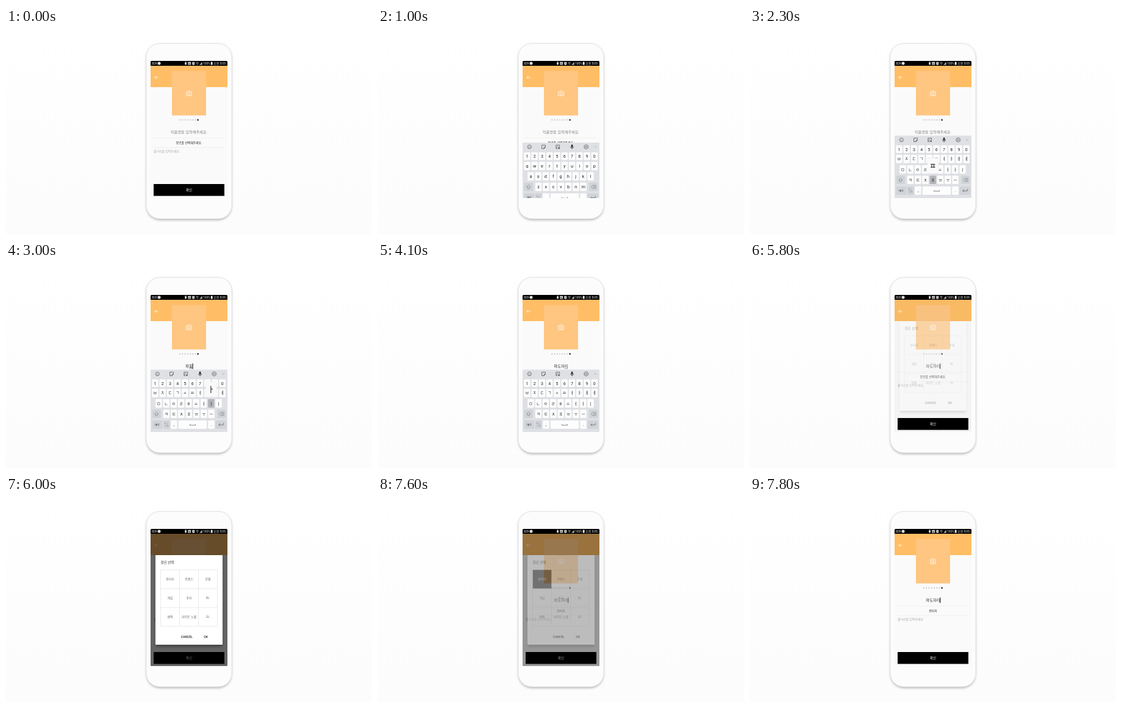
Recreate the animation shown at these times as an HTML page. Size 600x338 px, loop 8000 ms.

```html
<!DOCTYPE html>
<html lang="ko">
<head>
<meta charset="utf-8">
<title>작품 등록</title>
<style>
html, body { margin: 0; width: 100%; height: 100%; overflow: hidden; background: #fefefe; }
svg { display: block; width: 600px; height: 338px; }
text { font-family: 'Noto Sans CJK KR', 'Noto Sans CJK JP', 'Noto Sans CJK', sans-serif; }
.latin { font-family: Roboto, 'Noto Sans CJK KR', sans-serif; }
</style>
</head>
<body>
<svg id="stage" viewBox="0 0 600 338">
  <defs>
    <linearGradient id="wall" x2="0" y2="1"><stop stop-color="#fff"/><stop offset="1" stop-color="#fcfcfc"/></linearGradient>
    <filter id="soft" x="-20%" y="-20%" width="140%" height="140%"><feGaussianBlur stdDeviation="2"/></filter>
    <clipPath id="screen"><rect x="237" y="54" width="126" height="225" rx="1.5"/></clipPath>
  </defs>
  <rect width="600" height="338" fill="url(#wall)"/>
  <rect x="230.5" y="27" width="139" height="288" rx="22" fill="#000" opacity=".3" filter="url(#soft)"/>
  <rect x="230" y="25.5" width="140" height="287.5" rx="22" fill="#fcfcfc" stroke="#e2e2e2" stroke-width=".8"/>
  <g clip-path="url(#screen)">
    <rect x="237" y="54" width="126" height="225" fill="#fafafa"/>
    <g id="page"></g>
    <g id="keyboard"></g>
    <rect id="dim" x="237" y="62" width="126" height="217"/>
    <g id="dialog"></g>
    <g id="status"></g>
  </g>
</svg>
<script>
const LOOP = 8000, STEP = 100;
const TITLE_SIZE = 6.2, SYLLABLE = 0.92 * TITLE_SIZE;
const $ = id => document.getElementById(id);
const clamp = v => Math.max(0, Math.min(1, v));
const ramp = (t, from, to) => clamp((t - from) / (to - from));

function add(parent, tag, attrs) {
  const el = document.createElementNS('http://www.w3.org/2000/svg', tag);
  for (const k in attrs) el.setAttribute(k, attrs[k]);
  parent.appendChild(el);
  return el;
}
const rect = (g, x, y, width, height, fill, more) => add(g, 'rect', { x, y, width, height, fill, ...more });
const line = (g, d, stroke, w = 0.6, more) =>
  add(g, 'path', { d, stroke, fill: 'none', 'stroke-width': w, ...more });
const dot = (g, cx, cy, r, fill, more) => add(g, 'circle', { cx, cy, r, fill, ...more });

// Text centred vertically on cy
function label(g, str, x, cy, size, fill, more) {
  const el = add(g, 'text', { x, y: cy + size * 0.37, 'font-size': size, fill, 'text-anchor': 'middle', ...more });
  el.textContent = str;
  return el;
}
const START = { 'text-anchor': 'start' };
const LATIN = { class: 'latin' };

function buildStatus(g) {
  rect(g, 237, 54, 126, 8, '#000');
  label(g, 'BZK', 239.4, 58.1, 4.6, '#ddd', { ...START, ...LATIN });
  dot(g, 251, 58, 2.5, '#ddd');
  rect(g, 293.2, 56.2, 2.8, 4, '#ddd', { rx: 0.5 });
  rect(g, 293.8, 55.3, 1.6, 0.7, '#ddd');
  rect(g, 298.3, 55.7, 4.8, 4.8, '#ddd', { rx: 0.6 });
  label(g, 'N', 300.7, 58, 4.2, '#000', LATIN);
  rect(g, 305.3, 55.8, 4, 4.6, '#ddd', { rx: 0.8 });
  line(g, 'M307.3 56.8v1.6h1', '#000', 0.6);
  line(g, 'M311.4 57.2q2.2-2 4.4 0M312.3 58.4q1.3-1.2 2.6 0', '#ddd', 0.7);
  dot(g, 313.6, 59.7, 0.6, '#ddd');
  add(g, 'path', { d: 'M317 60.5h4.8v-4.8z', fill: '#aaa' });
  label(g, '100%', 323, 58.1, 4.8, '#eee', { ...START, ...LATIN });
  rect(g, 335.8, 56, 2.8, 4.6, '#eee', { rx: 0.4 });
  rect(g, 336.6, 55.3, 1.2, 0.8, '#eee');
  label(g, '오전 5:05', 350, 58.1, 4.9, '#eee', LATIN);
}

function buildPage(g) {
  rect(g, 237, 62, 126, 35, '#ffbe66');
  rect(g, 272, 70.5, 56, 73, '#ffc681');
  line(g, 'M249.8 81h-6M246.4 78.4l-2.6 2.6l2.6 2.6', '#fff', 0.8);
  line(g, 'M296.6 104.3h1.5l.9-1.2h2l.9 1.2h1.5q.9 0 .9.9v4.9q0 .9-.9.9h-6.8q-.9 0-.9-.9v-4.9q0-.9.9-.9z', '#fff', 0.9);
  dot(g, 300, 107.5, 1.8, 'none', { stroke: '#fff', 'stroke-width': 0.8 });
  for (let i = 0; i < 8; i++) dot(g, 285.2 + i * 4.2, 150.8, i < 7 ? 1 : 1.5, i < 7 ? '#bdbdbd' : '#444');
  line(g, 'M242 180.3h116M242 196.3h116', '#e6e6e6', 0.6);
  ui.title = label(g, '', 300, 171.2, TITLE_SIZE, '#333');
  ui.underline = line(g, '', '#333', 0.5);
  ui.cursor = rect(g, 0, 166.5, 1.2, 9, '#222');
  ui.genre = label(g, '', 300, 188, 4.8, '#222');
  label(g, '줄거리를 입력하세요.', 242, 202, 4.9, '#a8a8a8', START);
  rect(g, 242, 256, 116, 19.5, '#000');
  label(g, '확인', 300, 265.8, 5.5, '#fff', { 'font-weight': 500 });
}

const keys = {};
function key(g, id, x, y, w, fill = '#fdfdfd') {
  keys[id] = { x, y, fill, face: rect(g, x - w / 2, y - 6.9, w, 13.8, fill, { rx: 1.4 }) };
  return keys[id];
}

function buildKeyboard(g) {
  const grey = '#d0d3d8', ink = '#555';
  rect(g, 237, 176.6, 126, 103, '#dee0e4');
  dot(g, 248.3, 183.6, 3.2, 'none', { stroke: ink, 'stroke-width': 0.7 });
  dot(g, 247.2, 182.8, 0.5, ink);
  dot(g, 249.4, 182.8, 0.5, ink);
  line(g, 'M246.7 184.5q1.6 1.8 3.2 0', ink);
  line(g, 'M268.6 180.7h5.8v3.6l-2.2 2.3h-3.6zM274.4 184.2h-2.2v2.3', ink, 0.8);
  line(g, 'M291.9 180.7h5.8v3.4M294.6 186.5h-2.7v-5.8M292.2 185l2-2l1.7 1.6', ink, 0.8);
  dot(g, 296.7, 185.7, 1.3, ink);
  rect(g, 316.8, 179.8, 2.6, 4.7, '#222', { rx: 1.3 });
  line(g, 'M315.6 183.3q0 2.4 2.5 2.4t2.5-2.4M318.1 185.7v1.7', '#222', 0.7);
  line(g, 'M341.2 179.9l3.1 1.8v3.7l-3.1 1.8l-3.1-1.8v-3.7z', ink, 0.8);
  dot(g, 341.2, 183.6, 1.2, 'none', { stroke: ink, 'stroke-width': 0.7 });
  line(g, 'M354.6 182.8l1.8 1.7l1.8-1.7', '#888');

  const rows = [
    ['1234567890', '1234567890', 244.4, 199.4],
    ['ㅂㅈㄷㄱㅅㅛㅕㅑㅐㅔ', 'qwertyuiop', 244.4, 214.9],
    ['ㅁㄴㅇㄹㅎㅗㅓㅏㅣ', 'asdfghjkl', 250.4, 232],
    ['ㅋㅌㅊㅍㅠㅜㅡ', 'zxcvbnm', 263, 249.2]
  ];
  for (const [ko, en, x0, y] of rows) {
    [...ko].forEach((ch, i) => {
      const k = key(g, ch, x0 + i * 12.27, y, 10.4);
      if (ko === en) {
        k.face.setAttribute('height', 12.6);
        label(g, ch, k.x, y - 0.2, 7, '#222', LATIN);
      } else {
        k.ko = label(g, ch, k.x, y, 6.8, '#222', { 'font-weight': 500 });
        k.en = label(g, en[i], k.x, y - 0.4, 7.4, '#222', LATIN);
      }
    });
  }
  key(g, 'shift', 246.8, 249.2, 14.6, grey);
  line(g, 'M246.8 246l3.2 3.3h-1.7v2.8h-3v-2.8h-1.7z', '#777');
  key(g, 'back', 353.2, 249.2, 14.6, grey);
  line(g, 'M349.4 249.2l2.3-2.5h5.3v5h-5.3zM353 248l2.4 2.4M355.4 248l-2.4 2.4', '#777');
  key(g, 'sym', 247.9, 266.8, 16.8, grey);
  label(g, '!#1', 247.9, 266.8, 5.6, '#333', LATIN);
  key(g, 'lang', 263, 266.8, 10.6, grey);
  label(g, '가', 260.9, 264.9, 3.4, '#777');
  label(g, 'A', 265.2, 268.9, 3.6, '#777', LATIN);
  line(g, 'M265.4 263.6l-4.6 6.6', '#888', 0.5);
  key(g, 'comma', 275.4, 266.8, 10.4);
  label(g, ',', 275.4, 266.4, 7, '#222', LATIN);
  key(g, 'space', 306, 266.8, 46.4);
  line(g, 'M301.5 266v1.8h9v-1.8', '#555', 0.7);
  key(g, 'dot', 336.6, 266.8, 10.4);
  label(g, '.', 336.6, 266.4, 7, '#222', LATIN);
  key(g, 'enter', 352.4, 266.8, 17.4, grey);
  line(g, 'M356.4 264.2v3h-7.6M351 265l-2.2 2.2l2.2 2.2', '#666', 0.8);

  ui.popup = add(g, 'g', {});
  rect(ui.popup, -9, -35.5, 18, 25, '#fafafa', { rx: 2, stroke: '#e4e4e4', 'stroke-width': 0.4 });
  ui.popupText = label(ui.popup, '', 0, -23, 12.5, '#111', { 'font-weight': 500 });
}

function buildDialog(g) {
  rect(g, 246, 99, 108, 148, '#000', { opacity: 0.35, filter: 'url(#soft)' });
  rect(g, 245, 97, 110, 147, '#fff', { rx: 0.8 });
  label(g, '장르 선택', 253.8, 109, 5.4, '#222', START);
  ui.cell = rect(g, 253.5, 121, 31, 31, '#333');
  line(g, 'M253.5 121h93v92.7h-93zM253.5 152h93M253.5 183h93M284.5 121v92.7M315.5 121v92.7', '#dcdcdc', 0.6);
  const genres = ['판타지', '로맨스', '무협', '게임', '추리', 'BL', '팬픽', '라이트 노벨', 'GL'];
  const names = genres.map((name, i) =>
    label(g, name, 269 + (i % 3) * 31, 136 + Math.floor(i / 3) * 31, 4.9, '#666'));
  ui.picked = names[0];
  const strong = { ...LATIN, 'font-weight': 500 };
  label(g, 'CANCEL', 296.2, 231.6, 5, '#222', strong);
  label(g, 'OK', 327.6, 231.6, 5, '#222', strong);
}

const ui = {};
buildPage($('page'));
buildKeyboard($('keyboard'));
buildDialog($('dialog'));
buildStatus($('status'));

// [press time, key, field text after the stroke, time the text shows]
const strokes = [
  [2300, 'ㅍ', 'ㅍ', 2400], [2500, 'ㅏ', '파', 2600], [2600, 'ㄷ', '팓', 2700], [2800, 'ㅗ', '파도', 2900],
  [2900, 'ㅈ', '파돚', 3000], [3000, 'ㅏ', '파도자', 3100], [3200, 'ㄹ', '파도잘', 3300], [3300, 'ㅣ', '파도자리', 3600]
];
const show = (el, on) => el.setAttribute('visibility', on ? 'visible' : 'hidden');

function drawField(t) {
  const done = strokes.filter(s => t >= s[3]).pop();
  const text = done ? done[2] : '';
  ui.title.textContent = text || '작품명을 입력해주세요.';
  ui.title.setAttribute('fill', text ? '#222' : '#858585');
  const end = 300 + text.length * SYLLABLE / 2;
  ui.underline.setAttribute('d', `M${end - SYLLABLE + 0.4} 174.8H${end - 0.4}`);
  show(ui.underline, text && t < 4600);
  ui.cursor.setAttribute('x', end - 0.2);
  const blank = (t >= 4100 && t < 4400) || (t >= 5100 && t < 5800);
  show(ui.cursor, text && !blank);
  const chosen = t >= 7300;
  ui.genre.textContent = chosen ? '판타지' : '장르를 선택해주세요.';
}

function drawKeyboard(t) {
  const rise = 1 - (1 - ramp(t, 800, 1100)) ** 2;
  const fall = ramp(t, 4500, 4800) ** 1.4;
  $('keyboard').setAttribute('transform', `translate(0 ${103 * (1 - rise + fall)})`);
  show($('keyboard'), rise > 0 && fall < 1);
  const stroke = strokes.find(s => t >= s[0] && t < s[0] + 100);
  const down = stroke ? stroke[1] : t >= 1600 && t < 2000 ? 'lang' : '';
  const korean = t >= 2000;
  for (const id in keys) {
    const k = keys[id];
    k.face.setAttribute('fill', id === down ? '#b2b4b8' : k.fill);
    if (k.ko) {
      k.ko.setAttribute('opacity', korean ? 1 : 0);
      k.en.setAttribute('opacity', korean ? 0 : 1);
    }
  }
  ui.popup.setAttribute('opacity', stroke ? 1 : 0);
  if (stroke) {
    ui.popup.setAttribute('transform', `translate(${keys[down].x} ${keys[down].y})`);
    ui.popupText.textContent = down;
  }
}

function drawDialog(t) {
  const open = ramp(t, 5700, 6000), left = 1 - ramp(t, 7500, 7800);
  $('dialog').setAttribute('opacity', open ** 1.1 * left ** 2.5);
  $('dim').setAttribute('opacity', 0.6 * open ** 3 * left);
  const pick = ramp(t, 6600, 6900);
  ui.cell.setAttribute('opacity', pick);
  const tone = Math.round(102 + 153 * pick);
  ui.picked.setAttribute('fill', `rgb(${tone},${tone},${tone})`);
}

function draw(ms) {
  const t = Math.floor((ms % LOOP) / STEP) * STEP;
  drawField(t);
  drawKeyboard(t);
  drawDialog(t);
}

const begin = performance.now();
function tick() {
  draw(performance.now() - begin);
  requestAnimationFrame(tick);
}
tick();
</script>
</body>
</html>
```
